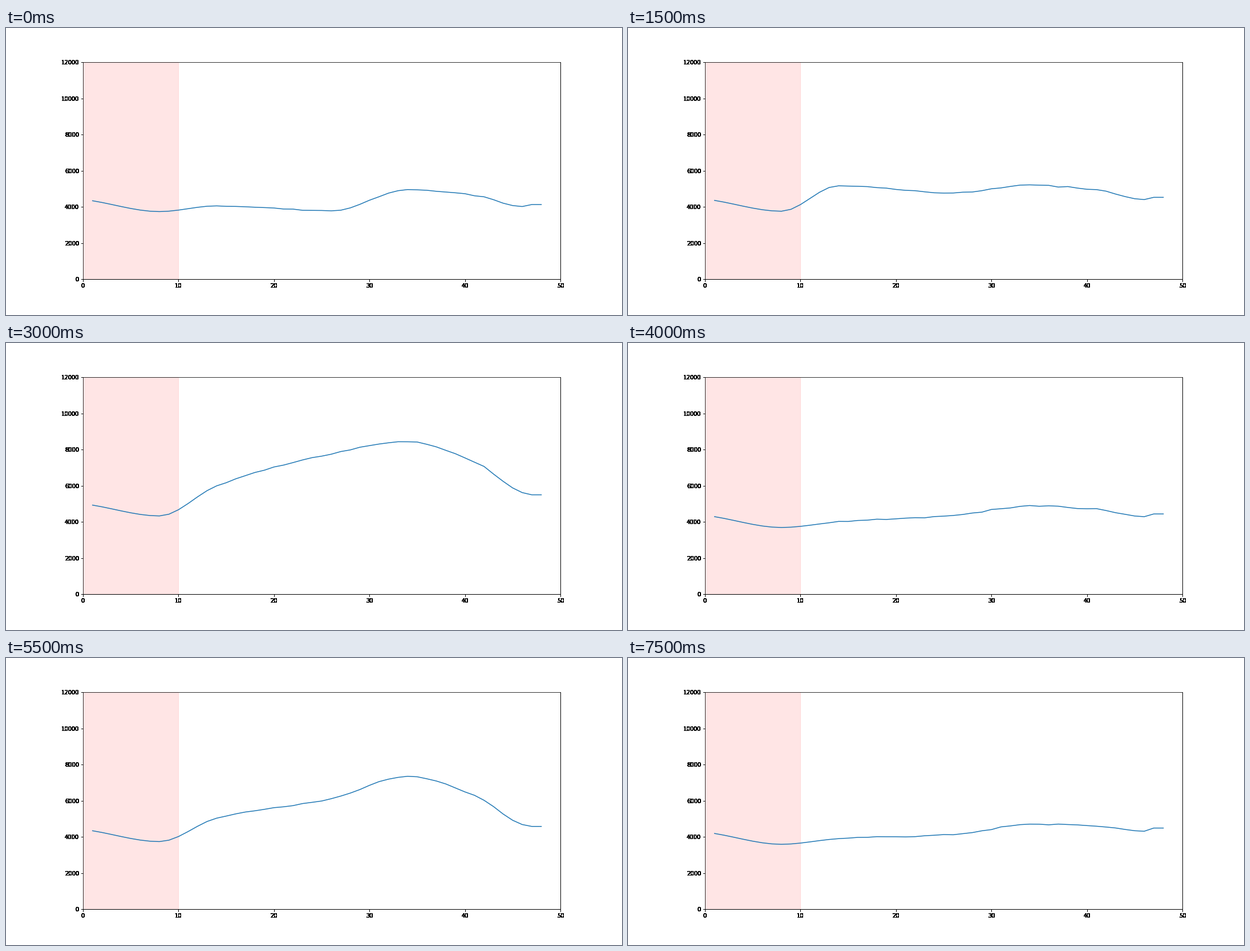
A matplotlib script for the animation above (8000 ms loop, 1080 by 504 pixels).

```python
import numpy as np
import matplotlib.pyplot as plt
from matplotlib.animation import FuncAnimation

plt.rcParams["font.family"] = "DejaVu Sans"
STEP_MS = 500
LAYERS = 40
SLOTS = np.arange(1, 49)

# Slots where a day turns: start, night low, morning, midday, peak, evening, end.
KNOTS = np.array([1, 8, 14, 26, 34, 41, 46, 47, 48])

# Each day: night low, morning, midday and peak level, in tens.
DAYS = [
    (374, 406, 378, 495),
    (338, 380, 395, 455),
    (354, 495, 475, 504),
    (376, 518, 476, 521),
    (378, 510, 510, 567),
    (382, 530, 655, 775),
    (433, 599, 778, 844),
    (475, 520, 540, 586),
    (369, 400, 436, 488),
    (369, 505, 485, 523),
    (369, 510, 520, 576),
    (374, 504, 613, 735),
    (383, 515, 510, 554),
    (362, 506, 478, 513),
    (371, 410, 400, 476),
    (359, 390, 413, 470),
]


def smooth(y):
    """Cubic through the knots that never overshoots, sampled at every slot."""
    h = np.diff(KNOTS)
    d = np.diff(y) / h
    slope = np.concatenate([d[:1], np.zeros(len(d) - 1), d[-1:]])
    same = d[:-1] * d[1:] > 0
    a, b = d[:-1][same], d[1:][same]
    slope[1:-1][same] = 2 * a * b / (a + b)
    i = np.clip(np.searchsorted(KNOTS, SLOTS, side="right") - 1, 0, len(h) - 1)
    t = (SLOTS - KNOTS[i]) / h[i]
    return (y[i] * (1 + 2 * t) * (1 - t) ** 2
            + y[i + 1] * t ** 2 * (3 - 2 * t)
            + h[i] * t * (1 - t) * (slope[i] * (1 - t) - slope[i + 1] * t))


def day_curve(day):
    night, morning, midday, peak = DAYS[day]
    start = night + 60
    end = DAYS[(day + 1) % len(DAYS)][0] + 75  # runs on into the next night
    fall = peak - end
    evening = peak - 0.38 * fall
    dip = end - 20 + 0.11 * fall
    levels = [start, night, morning, midday, peak, evening, dip, end, end]
    wobble = np.random.default_rng(day).normal(0, 1.8, len(SLOTS))
    wobble[(SLOTS < 14) | (SLOTS > 43)] = 0
    return 10 * (smooth(np.array(levels, float)) + wobble)


def add_axes(fig):
    ax = fig.add_axes([0.125, 0.125, 0.775, 0.755])
    ax.set(xlim=(0, 50), ylim=(0, 12000),
           xticks=range(0, 51, 10), yticks=range(0, 12001, 2000))
    return ax


fig = plt.figure(figsize=(15, 7), dpi=72, facecolor="white")

# Stacked copies of the axes give the labels their heavy edges.
for _ in range(LAYERS):
    ax = add_axes(fig)
ax.axvspan(0, 10, color="red", alpha=0.1)
line, = ax.plot(SLOTS, day_curve(0), color="#1f77b4", lw=1.5)


def update(day):
    line.set_ydata(day_curve(day))
    return line,


anim = FuncAnimation(fig, update, frames=len(DAYS), interval=STEP_MS,
                     init_func=lambda: update(0), repeat=True, repeat_delay=0)
plt.show()
```
